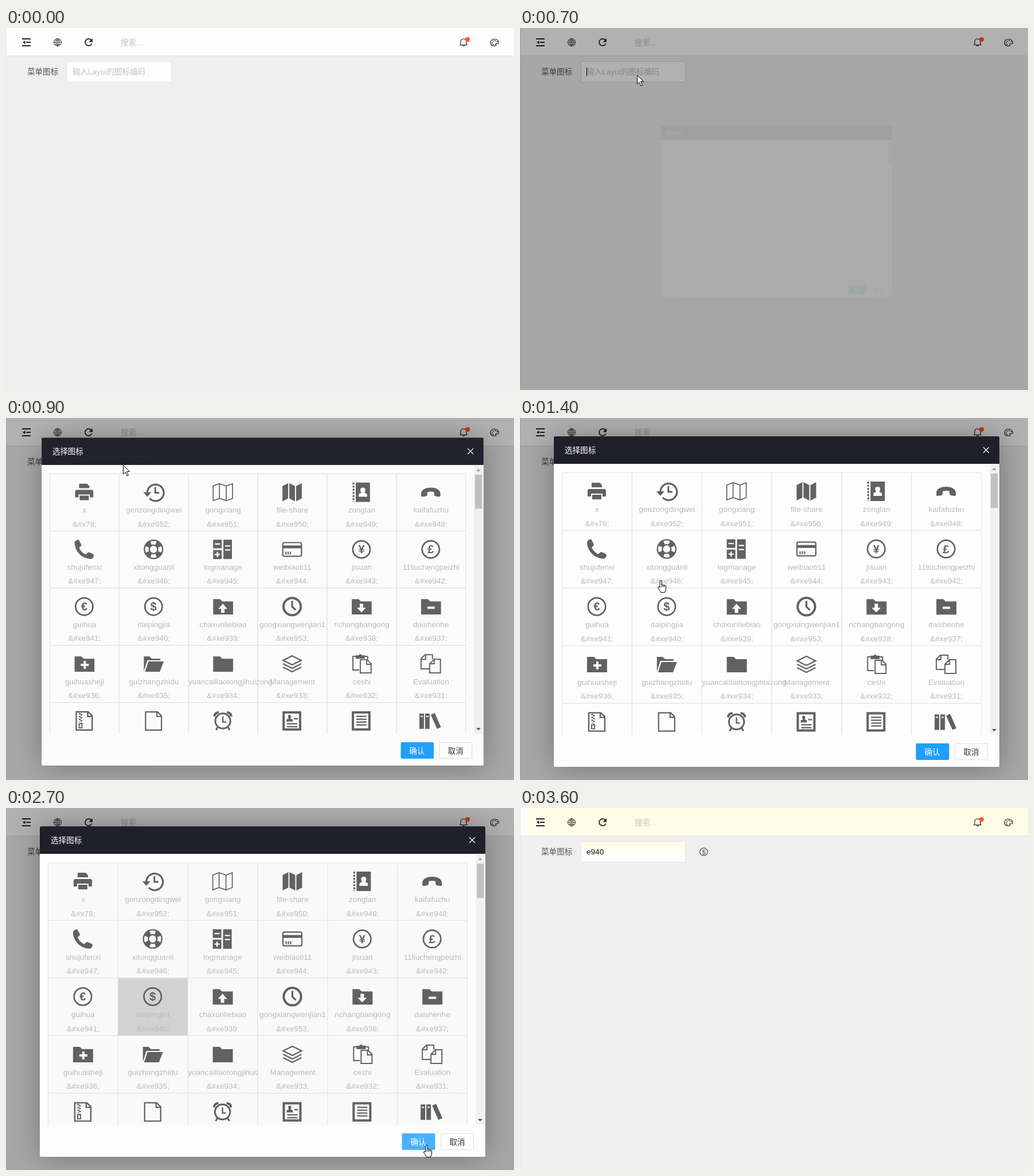
These frames come from a looping animation (886x632 px, 4.5 s). An HTML page:

```html
<!DOCTYPE html>
<html lang="zh-CN">
<head>
<meta charset="utf-8">
<title>选择图标</title>
<style>
html, body { margin: 0; width: 100%; height: 100%; overflow: hidden; background: #efefef }
svg { display: block; width: 886px; height: 632px }
text { font: 13.57px "Liberation Sans", "Noto Sans CJK SC", "Noto Sans CJK", sans-serif; white-space: pre }
.mid { text-anchor: middle }
.line { fill: none; stroke: #222; stroke-width: 1.2 }
.cell { fill: none; stroke: #e4e4e4 }
.cell + g { fill: #616161; stroke: #616161; stroke-width: 0 }
.cell ~ text { fill: #bbb }
.picked .cell { fill: #f9f9f9 }
.picked .chosen .cell { fill: #d2d2d2 }
#grid { --paper: #fdfdfd }
#grid.picked { --paper: #f9f9f9 }
.cut { fill: var(--paper); stroke: var(--paper) }
.glyph { font-size: 20px; font-weight: bold; text-anchor: middle }
</style>
</head>
<body>
<svg viewBox="0 0 886 632">
  <defs>
    <clipPath id="view"><path d="M59 80H836V553H59z"/></clipPath>
    <linearGradient id="fade" x2="0" y2="1">
      <stop offset=".1" stop-color="#fffde6"/><stop offset=".75" stop-color="#fdfdfd"/>
    </linearGradient>
  </defs>

  <path fill="#efefef" d="M0 0H886V632H0z"/>
  <path fill="#fdfdfd" d="M0 0H886V48H0z"/>
  <path id="tint" fill="#fffde6" d="M8 48L16 0H886V48z"/>
  <path fill="#e7e7e7" d="M0 48H886V49.5H0zM0 0H1V632H0z"/>
  <g class="line">
    <path stroke-width="1.8" d="M28 19H43M35 25H43M28 31H43"/>
    <path fill="#222" stroke="none" d="M29 25L33.500 22V28z"/>
    <circle cx="90" cy="25" r="6.500" stroke-width="1"/>
    <path stroke-width=".8" d="M83.500 25H96.500M90 18.500V31.500M85 21Q90 23 95 21M85 29Q90 27 95 29M90 18.500Q83.500 25 90 31.500Q96.500 25 90 18.500"/>
    <path stroke-width="1.8" d="M149 21.500A6 6 0 1 0 149.700 27"/>
    <path fill="#222" stroke="none" d="M151 18V24.500H144.500z"/>
    <path d="M791 29.500H805M793 29V24Q793 19 798 19T803 24V29M796 30Q798 33.500 800 30"/>
    <path d="M855 30.500Q852 32 849 31Q844.500 29 845 25Q846 19.500 852 19.500T859.500 25Q859 28.500 856 27.500Q853 27 854 29z"/>
    <path stroke-width="2" stroke-linecap="round" d="M848 26h.1M849.500 23h.1M853 22h.1M856.500 24h.1M849.500 29h.1"/>
  </g>
  <circle cx="805" cy="20" r="4" fill="#ff5722"/>
  <text x="200" y="30" fill="#c4c4c4">搜索...</text>
  <text x="37" y="81" fill="#555">菜单图标</text>
  <rect id="input" x="106.500" y="58.500" width="182" height="36" rx="1"/>
  <text id="value" x="116" y="81"></text>
  <path id="caret" stroke="#000" d="M116.500 69V84"/>
  <g id="result" fill="none" stroke="#555">
    <circle cx="320.500" cy="76.500" r="6.700" stroke-width="1.300"/>
    <text class="mid" x="320.500" y="80.500" style="font-size:11px" fill="#555" stroke="none">$</text>
  </g>

  <path id="shade" opacity=".3" d="M0 0H886V632H0z"/>

  <g id="dialog">
    <rect x="59" y="32" width="777" height="577" rx="2" fill="#fdfdfd" style="filter:drop-shadow(1px 1px 25px rgba(0,0,0,.3))"/>
    <path fill="#20202b" d="M59 80V34Q59 32 61 32H834Q836 32 836 34V80z"/>
    <text x="78" y="61" fill="#fff">选择图标</text>
    <path stroke="#fff" stroke-width="1.300" d="M808 51L818 61M818 51L808 61"/>
    <g clip-path="url(#view)">
      <g id="grid"></g>
      <path fill="#f1f1f1" d="M819.500 81H834V553H819.500z"/>
      <path fill="#c1c1c1" d="M821 97H833.500V157H821z"/>
      <path fill="#a3a3a3" d="M823 91L827 87L831 91z"/>
      <path fill="#505050" d="M823 543L827 547L831 543z"/>
    </g>
    <g id="confirm">
      <rect x="690.500" y="568" width="58" height="29" rx="2" fill="#1e9fff"/>
      <text class="mid" x="719" y="588" fill="#fff">确认</text>
    </g>
    <rect x="758.500" y="568.500" width="57" height="28" rx="2" fill="#fff" stroke="#dedede"/>
    <text class="mid" x="787" y="588" fill="#333">取消</text>
  </g>
  <path id="cursor" fill="#fff" stroke="#000" stroke-linejoin="round"/>
</svg>

<script>
const $ = id => document.getElementById(id);

// Icon parts, drawn around 0,0
const solid = d => `<path d="${d}"/>`;
const cut = (d, width = 0) => `<path class="cut" stroke-width="${width}" ${width ? 'style="fill:none"' : ''} d="${d}"/>`;
const line = (d, width = 2) => `<path fill="none" stroke-width="${width}" d="${d}"/>`;
const ring = (r, width, extra = '') => `<circle r="${r}" fill="none" stroke-width="${width}" ${extra}/>`;
const coin = sign => ring(15.2, 2.7) + `<text class="glyph" y="7" style="fill:#616161">${sign}</text>`;
const folder = mark => solid('M-17-13H-5L-1-9H18V14H-17z') + mark;
const sheet = 'M-14-16H7L14-9V16H-14zM6-16V-8H14';

const icons = [
  solid('M-9-15H5L9-11V-7H-9zM-13-4H13Q16-4 16-1V9H10V4H-10V9H-16V-1Q-16-4-13-4zM-8 6H8V14H-8z'),
  line('M-11 0A14.500 14.500 0 1 1-7 11', 3.2) + solid('M-18 0H-4L-11 8z') + line('M3-9V1H10', 3),
  line('M-17-11L-6-15 6-11 17-15V11L6 15-6 11-17 15zM-6-15V11M6-11V15', 1.7),
  solid('M-17-11L-7-16V11L-17 16zM-5-16L5-11V16L-5 11zM7-11L17-16V11L7 16z'),
  solid('M-10-17H15V17H-10z') + line('M-14-17V17', 3).replace('/>', ' stroke-dasharray="3.5 2"/>')
    + cut('M-5 8V5Q-5 2 0 1Q-2-1-2-4Q-2-8 2.500-8T7-4Q7-1 5 1Q10 2 10 5V8z'),
  solid('M-17 3C-17-5-8-8 0-8S17-5 17 3V6Q17 8 14 8L8 7Q6 6 6 4V0Q0-2-6 0V4Q-6 6-8 7L-14 8Q-17 8-17 6z'),
  solid('M-17-12Q-16-16-11-17Q-9-17-8-14L-5-8Q-5-6-9-3Q-5 6 3 9Q6 5 8 5L15 8Q17 9 17 11Q16 16 12 17Q-4 16-12 4Q-17-4-17-12z'),
  ring(16, 2.4) + ring(7.5, 2.4) + ring(11.7, 8, 'pathLength="8" stroke-dasharray="1" stroke-dashoffset="-.5"'),
  solid('M-17-17H-2V-2H-17zM-17 1H-2V17H-17zM1-17H16V17H1z')
    + cut('M-14-9.500H-5M-14 9H-5M-9.500 4.500V13.500M4-6H13M4 1H13', 2.4),
  line('M-14-12H14Q16.500-12 16.500-9V9Q16.500 12 14 12H-14Q-16.500 12-16.500 9V-9Q-16.500-12-14-12z', 2.2)
    + solid('M-17-7H17V-2H-17z') + line('M-11 4V9M-7 4V9M-3 4V9', 2.2),
  coin('¥'), coin('£'), coin('€'), coin('$'),
  folder(cut('M0-5L8 4H3V11H-3V4H-8z')),
  ring(15.2, 4) + line('M0-10V0L6 6', 3.2),
  folder(cut('M0 10L8 2H3V-5H-3V2H-8z')),
  folder(cut('M-6 2H7', 4)),
  folder(cut('M-6 2H8M1-5V9', 4)),
  solid('M-17 13V-13H-7L-3-9H12V-6H-11zM-15 14L-9-4H18L11 14z'),
  folder(''),
  line('M0-14L16-6 0 2-16-6zM-16 0L0 8 16 0M-16 6L0 14 16 6', 2.3),
  line('M-4 11H-15V-13H-10M6-13H11V-7M-2-7H10L17 0V16H-2zM9-7V1H17', 2) + solid('M-10-15H-5Q-2-19 1-15H6V-9H-10z'),
  line('M-2 9H-17V-9L-10-16H3V-8M-17-8H-9V-16M6-8H17V16H-2V0zM6-8V0H-2', 2),
  line(sheet, 2.4) + line('M-8-14V2M-5-12V4', 3).replaceAll('/>', ' stroke-dasharray="2.5"/>') + line('M-9 5H-4V12H-9z'),
  line(sheet, 2.2),
  ring(13.2, 3) + line('M0-8V2H6', 2.4) + line('M-15-8Q-14-15-7-15M15-8Q14-15 7-15', 4) + line('M-9 11L-12 16M9 11L12 16', 3),
  line('M-15-15H14V15H-15z', 4) + solid('M-10 1V-2Q-9-4-6-4Q-9-10-5-11Q0-10-3-4Q0-4 1-2V1z') + line('M3-4H10M-9 5H9M-9 10H9', 2.4),
  line('M-15-15H14V15H-15z', 4) + line('M-9-8H9M-9-3H9M-9 2H9M-9 7H9', 2.3),
  solid('M-20-13H-12V14H-20zM-10-13H-2V14H-10zM0-11L7-14 18 11 11 14z') + cut('M-18-8H-14M-8-8H-4', 2),
];
const names = ('x genzongdingwei gongxiang file-share zonglan kaifafuzhu shujufenxi xitongguanli logmanage weibiaoti11 jisuan '
  + '11liuchengpeizhi guihua daipingjia chaxunliebiao gongxiangwenjian1 richangbangong daishenhe guihuasheji guizhangzhidu '
  + 'yuancailiaotongjihuizong Management ceshi Evaluation').split(' ');
const codeOf = i => i === 0 ? 'x78' : 'xe' + (i < 15 ? 953 - i : i === 15 ? 953 : 954 - i);

const cellW = 121.85, cellH = 100.65, chosen = 13;
$('grid').innerHTML = icons.map((icon, i) => {
  const name = names[i] || '';
  const label = name.length > 20 ? 'x="0"' : `class="mid" x="${cellW / 2}"`;
  return `<g class="${i === chosen ? 'chosen' : ''}" transform="translate(${73.5 + i % 6 * cellW} ${95.5 + Math.floor(i / 6) * cellH})">
    <rect class="cell" width="${cellW}" height="${cellH}"/>
    <g transform="translate(${cellW / 2 - .5} 32.500)">${icon}</g>
    <text ${label} y="68.700">${name}</text>
    <text class="mid" x="${cellW / 2}" y="93">${name && `&amp;#${codeOf(i)};`}</text></g>`;
}).join('');

const arrow = 'M.5.5V16L4 12.500 7 19 9.500 18 6.500 11.500H11.500z';
const hand = 'M4 13V2Q4 .5 5.500 .5T7 2V8Q8.500 6.500 9.500 8.500Q11 7.500 12 9Q14 8.500 14.500 11V15Q14 18 12.500 21.500H5.500Q4 18 .8 14Q0 11.500 2 11.500Q3 11.500 4 13zM7 8V12M9.500 8.500V12M12 9V12';

// Keys are [time, a, b]
const pointer = [
  [100, 693, 84], [200, 570, 76], [300, 410, 75], [400, 285, 79], [500, 216, 82], [600, 204, 82], [1100, 204, 82],
  [1200, 225, 150], [1300, 237, 235], [1400, 240, 283], [1500, 252, 318], [1600, 258, 333], [1800, 258, 333],
  [1900, 268, 345], [2000, 296, 380], [2100, 346, 424], [2200, 560, 535], [2300, 728, 588],
  [2900, 728, 588], [3000, 732, 588], [3400, 732, 588], [3500, 738, 579],
];
const popup = [ // scale, opacity
  [700, .52, .05], [800, .85, .7], [900, .992, .985], [1000, 1, 1], [2800, 1, 1], [2900, 1.041, .8], [3000, .75, .1],
];
function sample(keys, t) {
  const next = keys.findIndex(k => k[0] >= t);
  if (next < 1) return keys[next ? keys.length - 1 : 0].slice(1);
  const [a, b] = [keys[next - 1], keys[next]], p = (t - a[0]) / (b[0] - a[0]);
  return [1, 2].map(i => a[i] + (b[i] - a[i]) * p);
}
const show = (id, on) => $(id).style.display = on ? '' : 'none';
const set = (id, attrs) => Object.entries(attrs).forEach(([k, v]) => $(id).setAttribute(k, v));

function draw(now) {
  const t = Math.floor(now % 4500 / 100) * 100;
  const within = (from, to) => t >= from && t < to;
  const filled = t >= 2900, tinted = t >= 3000;

  show('tint', tinted);
  show('caret', within(700, 1000));
  show('result', filled);
  set('input', { fill: tinted ? 'url(#fade)' : '#fdfdfd', stroke: within(700, 2900) ? '#d2d2d2' : '#e2e9e8' });
  set('value', { fill: filled ? '#111' : '#c2c2c2' });
  $('value').textContent = filled ? 'e940' : '输入Layui的图标编码';

  show('shade', within(700, 2900));
  show('dialog', within(700, 3100));
  show('grid', t >= 900);
  const [scale, opacity] = sample(popup, t);
  set('dialog', { opacity, transform: `translate(447.500 320.500) scale(${scale}) translate(-447.500 -320.500)` });
  set('grid', { class: t >= 1800 ? 'picked' : '' });
  set('confirm', { opacity: t >= 2300 ? .8 : 1 });

  show('cursor', within(100, 3600));
  set('cursor', { d: within(1200, 3000) ? hand : arrow, transform: `translate(${sample(pointer, t)})` });
}
const start = performance.now();
(function frame() {
  draw(performance.now() - start);
  requestAnimationFrame(frame);
})();
</script>
</body>
</html>
```
